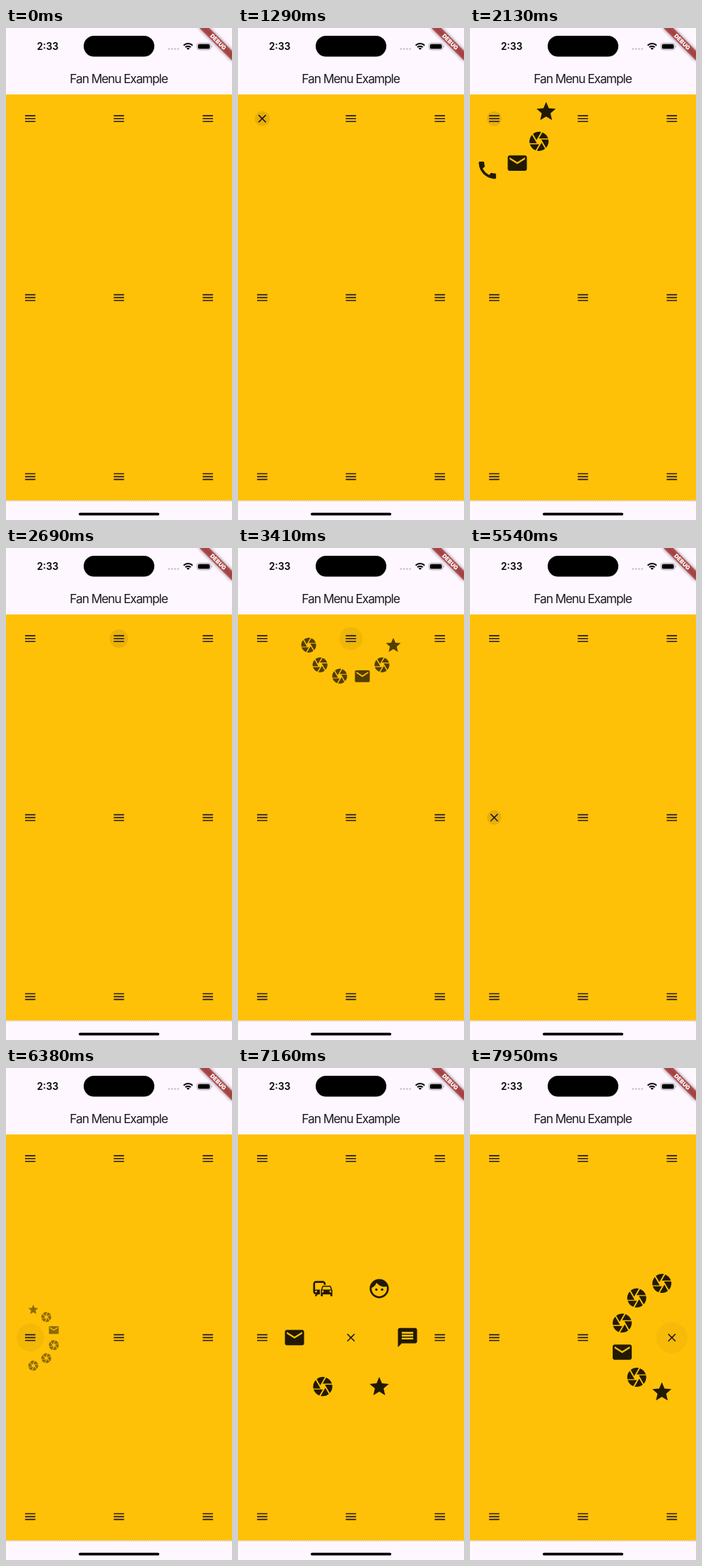
These frames come from a looping animation (320x696 px, 8 s). An HTML page:

```html
<!DOCTYPE html>
<html lang="en">
<head>
<meta charset="utf-8">
<title>Fan Menu Example</title>
<style>
html, body { margin: 0; width: 100%; height: 100%; overflow: hidden; background: #fef7ff; }
svg { display: block; width: 320px; height: 696px; font-family: Inter, Roboto, sans-serif; text-anchor: middle; }
</style>
</head>
<body>
<svg id="stage" viewBox="0 0 320 696">
  <defs>
    <path id="menu" d="M3 18h18v-2H3v2zm0-5h18v-2H3v2zm0-7v2h18V6H3z"/>
    <path id="close" d="M19 6.41L17.59 5 12 10.59 6.41 5 5 6.41 10.59 12 5 17.59 6.41 19 12 13.41 17.59 19 19 17.59 13.41 12z"/>
    <path id="call" d="M20.01 15.38c-1.23 0-2.42-.2-3.53-.56-.35-.12-.74-.03-1.01.24l-1.57 1.97c-2.83-1.35-5.48-3.9-6.89-6.83l1.95-1.66c.27-.28.35-.67.24-1.02-.37-1.11-.56-2.3-.56-3.53 0-.54-.45-.99-.99-.99H4.19C3.65 3 3 3.24 3 3.99 3 13.28 10.73 21 20.01 21c.71 0 .99-.63.99-1.18v-3.45c0-.54-.45-.99-.99-.99z"/>
    <path id="mail" d="M20 4H4c-1.1 0-1.99.9-1.99 2L2 18c0 1.1.9 2 2 2h16c1.1 0 2-.9 2-2V6c0-1.1-.9-2-2-2zm0 4l-8 5-8-5V6l8 5 8-5v2z"/>
    <path id="camera" d="M9.4 10.5l4.77-8.26C13.47 2.09 12.75 2 12 2c-2.4 0-4.6.85-6.32 2.25l3.66 6.35.06-.1zM21.54 9c-.92-2.92-3.15-5.26-6-6.34L11.88 9h9.66zm.26 1h-7.49l.29.5 4.76 8.25C21 16.97 22 14.61 22 12c0-.69-.07-1.35-.2-2zM8.54 12l-3.9-6.75C3.01 7.03 2 9.39 2 12c0 .69.07 1.35.2 2h7.49l-1.15-2zm-6.08 3c.92 2.92 3.15 5.26 6 6.34L12.12 15H2.46zm11.27 0l-3.9 6.76c.7.15 1.42.24 2.17.24 2.4 0 4.6-.85 6.32-2.25l-3.66-6.35-.93 1.6z"/>
    <path id="star" d="M12 17.27L18.18 21l-1.64-7.03L22 9.24l-7.19-.61L12 2 9.19 8.63 2 9.24l5.46 4.73L5.82 21z"/>
    <path id="face" d="M9 11.75c-.69 0-1.25.56-1.25 1.25s.56 1.25 1.25 1.25 1.25-.56 1.25-1.25-.56-1.25-1.25-1.25zm6 0c-.69 0-1.25.56-1.25 1.25s.56 1.25 1.25 1.25 1.25-.56 1.25-1.25-.56-1.25-1.25-1.25zM12 2C6.48 2 2 6.48 2 12s4.48 10 10 10 10-4.48 10-10S17.52 2 12 2zm0 18c-4.41 0-8-3.59-8-8 0-.29.02-.58.05-.86 2.36-1.05 4.23-2.98 5.21-5.37C11.07 8.33 14.05 10 17.42 10c.78 0 1.53-.09 2.25-.26.21.71.33 1.47.33 2.26 0 4.41-3.59 8-8 8z"/>
    <path id="chat" d="M20 2H4c-1.1 0-1.99.9-1.99 2L2 22l4-4h14c1.1 0 2-.9 2-2V4c0-1.1-.9-2-2-2zm-2 12H6v-2h12v2zm0-3H6V9h12v2zm0-3H6V6h12v2z"/>
    <path id="commute" d="M12 4H5C3.34 4 2 5.34 2 7v8c0 1.66 1.34 3 3 3l-1 1v1h1l2-2.03L9 18v-5H4V5.98L13 6v2h2V7c0-1.66-1.34-3-3-3zM5 14c.55 0 1 .45 1 1s-.45 1-1 1-1-.45-1-1 .45-1 1-1zm15.57-4.34c-.14-.4-.52-.66-.97-.66h-7.19c-.46 0-.83.26-.98.66L10 13.77l.01 5.51c0 .38.31.72.69.72h.62c.38 0 .68-.38.68-.76V18h8v1.24c0 .38.31.76.69.76h.61c.38 0 .69-.34.69-.72l.01-1.37v-4.14l-1.43-4.11zm-8.16.34h7.19l1.03 3h-9.25l1.03-3zM12 16c-.55 0-1-.45-1-1s.45-1 1-1 1 .45 1 1-.45 1-1 1zm8 0c-.55 0-1-.45-1-1s.45-1 1-1 1 .45 1 1-.45 1-1 1z"/>
    <filter id="soft" x="-20%" y="-80%" width="140%" height="260%"><feGaussianBlur stdDeviation="2.4"/></filter>
  </defs>

  <rect width="320" height="696" fill="#fef7ff"/>
  <rect y="94" width="320" height="574.5" fill="#ffc107"/>
  <path d="M0 669H320" stroke="#b9ad9c" stroke-dasharray="1.5 1.5"/>

  <text x="59" y="31" font-size="13.8" font-weight="600">2:33</text>
  <rect x="110" y="11" width="100" height="29.5" rx="14.75"/>
  <path d="M230.7 29.6h13" stroke="#c5bfc9" stroke-width="2.7" stroke-linecap="round" stroke-dasharray="0 4.3"/>
  <g transform="translate(257.9 31)">
    <path d="M-6.3-6.3A8.9 8.9 0 0 1 6.3-6.3M-3.8-3.8A5.4 5.4 0 0 1 3.8-3.8" fill="none" stroke="#000" stroke-width="2"/>
    <path d="M0 0L-2.2-2.2A3.1 3.1 0 0 1 2.2-2.2z"/>
  </g>
  <rect x="270.4" y="21.4" width="19.6" height="9.6" rx="3" fill="none" stroke="#aaa5ad" stroke-width=".9"/>
  <rect x="271.8" y="22.8" width="16.8" height="6.8" rx="1.9"/>
  <path d="M291.2 24.7a1.7 1.7 0 0 1 0 3z" fill="#aaa5ad"/>

  <text x="159.5" y="78.2" font-size="17.4" letter-spacing="-1.1" fill="#1d1b20">Fan Menu Example</text>
  <rect x="103" y="685.8" width="114" height="3.8" rx="1.9"/>

  <g id="menus"></g>

  <g transform="translate(320) rotate(45)">
    <rect x="-33" y="22.8" width="66" height="9.8" opacity=".5" filter="url(#soft)"/>
    <rect x="-33" y="22.8" width="66" height="9.8" fill="#b71c1c" fill-opacity=".63"/>
    <text y="30.6" font-size="8.1" font-weight="900" fill="#fff">DEBUG</text>
  </g>
</svg>
<script>
const LOOP = 8000, STEP = 55.85, PHASE = 1290, MOVE = 250, RIPPLE = 440, RADIUS = 80;
const XS = [34.3, 159.9, 285.8], YS = [128.2, 381.4, 634.6];
const quarter = ['star', 'camera', 'mail', 'call'];
const half = ['star', 'camera', 'mail', 'camera', 'camera', 'camera'];
const full = ['star', 'camera', 'mail', 'commute', 'face', 'chat'];

// One fan per button: first angle and spacing in degrees, opening and closing time
const fans = [
  { icons: quarter, from: -2.4, gap: 31.6, open: 1290, shut: 2130 },
  { icons: half, from: 15, gap: 30, open: 2740, shut: 3250, press: 2640 },
  { icons: quarter, from: 87.6, gap: 31.6, open: 3810, shut: 4700 },
  { icons: half, from: -75, gap: 30, open: 5540, shut: 6210 },
  { icons: full, from: 60, gap: 60, open: 6710, shut: 7220 },
  { icons: half, from: 105, gap: 30, open: 7720, shut: Infinity }
];

const menus = document.getElementById('menus');
const clamp = v => Math.max(0, Math.min(1, v));
const easeOut = v => 1 - (1 - v) ** 2;

function add(tag, attrs) {
  const el = document.createElementNS('http://www.w3.org/2000/svg', tag);
  for (const k in attrs) el.setAttribute(k, attrs[k]);
  return menus.appendChild(el);
}

function place(el, x, y, scale) {
  el.setAttribute('transform', `translate(${x} ${y}) scale(${scale}) translate(-12 -12)`);
}

const buttons = YS.flatMap((y, row) => XS.map((x, col) => {
  const fan = fans[row * 3 + col];
  const ripple = add('circle', { cx: x, cy: y, fill: '#3a2a20' });
  const icon = add('use', { href: '#menu', fill: '#1d1b20' });
  place(icon, x, y, 0.814);
  const items = fan ? fan.icons.map(name => add('use', { href: '#' + name, fill: '#211901' })) : [];
  return { fan, ripple, icon, items, cx: [28, 160, 292.2][col], cy: row ? 381.4 : 121.4 };
}));

function drawFan({ fan, ripple, icon, items, cx, cy }, t) {
  const isOpen = t >= fan.open && t < fan.shut;
  icon.setAttribute('href', isOpen ? '#close' : '#menu');

  const p = easeOut(clamp((t - fan.open) / MOVE) - clamp((t - fan.shut) / MOVE));
  items.forEach((el, i) => {
    const a = (fan.from + fan.gap * i) * Math.PI / 180;
    place(el, cx + Math.cos(a) * RADIUS * p, cy + Math.sin(a) * RADIUS * p, 1.357 * p);
    el.setAttribute('opacity', p);
  });

  const tap = t >= fan.shut ? fan.shut : fan.press || fan.open;
  const u = clamp((t - tap) / RIPPLE);
  ripple.setAttribute('r', 10 + 12 * clamp(u * 2));
  ripple.setAttribute('opacity', t < tap ? 0 : 0.12 * (1 - u) ** 1.5);
}

function draw(now) {
  const time = now % LOOP;
  const t = PHASE + Math.floor((time - PHASE) / STEP) * STEP + 12;
  for (const b of buttons) if (b.fan) drawFan(b, t);
  requestAnimationFrame(draw);
}
requestAnimationFrame(draw);
</script>
</body>
</html>
```
